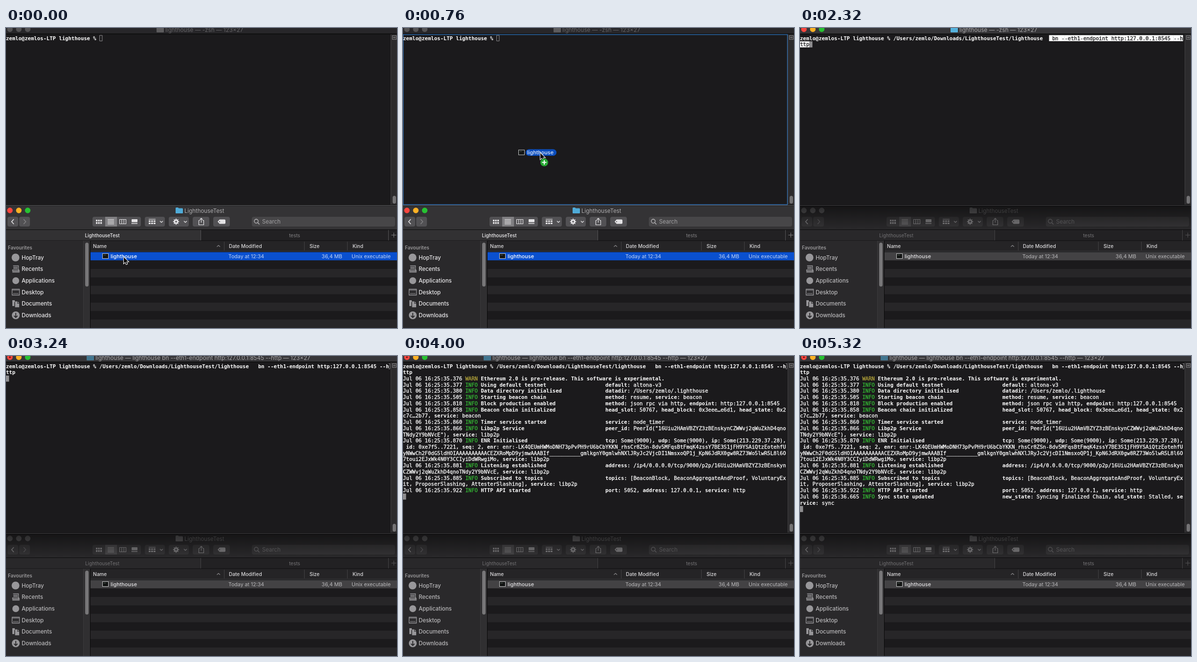
Recreate the animation shown at these times as an HTML page with a canvas. Size 800 by 615 pixels, loop 5360 ms.

```html
<!DOCTYPE html>
<html lang="en">
<head>
<meta charset="utf-8">
<style>
html, body { margin: 0; width: 100%; height: 100%; overflow: hidden; background: #1b1a1c; }
canvas { display: block; }
</style>
</head>
<body>
<canvas width="800" height="615"></canvas>
<script>
const ctx = document.querySelector('canvas').getContext('2d');
const LOOP = 5360, STEP = 40;
const DRAG = 100, DROP = 1040, ACTIVATE = 1080, SPACE = 1920, PASTE = 2120, ENTER = 3000, LOG = 3300;
const COLS = 123, CELL_W = 6.37, CELL_H = 12.73, TOP = 14.6;

const PEER = '16Uiu2HAmVBZYZ3zBEnskynCZWWvj2qWuZkhD4qnoTNdy2Y9bNVcE';
const ENR = 'enr:-LK4QEUmHWMoDNH73pPvPH9rU6bCbYKKN_rhsCr8ZSn-8dv5MFqsBtFmqK4zssY7BE3S1jFH9YSAiQtzEotehfU' +
  'yNWwCh2F0dG5ldHOIAAAAAAAAAACEZXRoMpD9yjmwAAABIf__________gmlkgnY0gmlwhNXlJRyJc2VjcDI1NmsxoQP1j_KpN6JdRX0gw8RZ73Wo5lwR5L8l6O' +
  '7toui2EJxWk4N0Y3CCIyiDdWRwgiMo';
const COMMAND = ' bn --eth1-endpoint http:127.0.0.1:8545 --http';
const LINES = [
  ['35.376', 'Ethereum 2.0 is pre-release. This software is experimental.', ''],
  ['35.377', 'Using default testnet', 'default: altona-v3'],
  ['35.380', 'Data directory initialised', 'datadir: /Users/zemlo/.lighthouse'],
  ['35.505', 'Starting beacon chain', 'method: resume, service: beacon'],
  ['35.818', 'Block production enabled', 'method: json rpc via http, endpoint: http:127.0.0.1:8545'],
  ['35.858', 'Beacon chain initialized', 'head_slot: 50767, head_block: 0x3eee…e6d1, head_state: 0x2c7c…2b77, service: beacon'],
  ['35.860', 'Timer service started', 'service: node_timer'],
  ['35.866', 'Libp2p Service', `peer_id: PeerId("${PEER}"), service: libp2p`],
  ['35.870', 'ENR Initialised', `tcp: Some(9000), udp: Some(9000), ip: Some(213.229.37.28), id: 0xe7f5..7221, seq: 2, enr: ${ENR}, service: libp2p`],
  ['35.881', 'Listening established', `address: /ip4/0.0.0.0/tcp/9000/p2p/${PEER}, service: libp2p`],
  ['35.885', 'Subscribed to topics', 'topics: [BeaconBlock, BeaconAggregateAndProof, VoluntaryExit, ProposerSlashing, AttesterSlashing], service: libp2p'],
  ['35.922', 'HTTP API started', 'port: 5052, address: 127.0.0.1, service: http'],
  ['36.665', 'Sync state updated', 'new_state: Syncing Finalized Chain, old_state: Stalled, service: sync'],
];

function rect(x, y, w, h, color, r = 0) {
  ctx.fillStyle = color;
  ctx.beginPath();
  ctx.roundRect(x, y, w, h, r);
  ctx.fill();
}
function disc(x, y, r, color) {
  rect(x - r, y - r, 2 * r, 2 * r, color, r);
}
function line(d, color, width = 1, x = 0, y = 0) {
  ctx.save();
  ctx.translate(x, y);
  ctx.strokeStyle = color;
  ctx.lineWidth = width;
  ctx.stroke(new Path2D(d));
  ctx.restore();
}
function shape(d, color, x = 0, y = 0) {
  ctx.save();
  ctx.translate(x, y);
  ctx.fillStyle = color;
  ctx.fill(new Path2D(d));
  ctx.restore();
}
function label(str, x, y, size, color, weight = 400, align = 'left') {
  ctx.font = `${weight} ${size}px Inter, sans-serif`;
  ctx.textAlign = align;
  ctx.fillStyle = color;
  ctx.fillText(str, x, y);
}
function folder(x, y, color) {
  shape('M0 1.5Q0 0 1.5 0H5L6.5 1.5H13.5Q15 1.5 15 3V11Q15 12 14 12H1Q0 12 0 11Z', color, x, y);
}
function lights(y, active) {
  ['#fb463f', '#fdb125', '#27c232'].forEach((c, i) => disc(8 + 18.2 * i, y, 5.7, active ? c : '#545355'));
}
function executable(x, y) {
  rect(x, y, 13, 11, '#c4c5c6');
  rect(x + 1, y + 1, 11, 9, '#121413');
  rect(x + 2.5, y + 3, 5, 1, '#4c5a50');
}

// Terminal text is laid on a character grid that wraps at the last column.
let col, row;
function print(str, color = '#fff', bold = false, back) {
  ctx.font = `${bold ? 'bold ' : ''}10.58px "DejaVu Sans Mono", monospace`;
  ctx.textAlign = 'left';
  ctx.lineWidth = .3;
  for (const ch of str) {
    if (col === COLS) newline();
    const x = col++ * CELL_W, y = TOP + row * CELL_H;
    if (back) rect(x, y, CELL_W + .3, 12.4, back);
    if (ch === ' ') continue;
    ctx.fillStyle = ctx.strokeStyle = color;
    ctx.fillText(ch, x, y + 9.9);
    if (!bold) ctx.strokeText(ch, x, y + 9.9);
  }
}
function newline() {
  col = 0;
  row++;
}
function printLog([time, message, fields]) {
  const warn = time === '35.376';
  print(`Jul 06 16:25:${time} `);
  print(warn ? 'WARN ' : 'INFO ', warn ? '#b5a63a' : '#35bd35');
  print(message.padEnd(fields ? 40 : 0), '#fff', true);
  fields.split(/(\w+)(?=: )/).forEach((part, i) => print(part, '#fff', i % 2 === 1));
  newline();
}

function terminal(t) {
  const active = t >= ACTIVATE, running = t >= ENTER;
  rect(0, 0, 800, 363, '#1b1a1c');
  rect(0, 0, 800, 12, active ? '#373639' : '#272629');
  rect(0, 11.5, 800, 1.3, '#060606');
  lights(2.5, active);
  if (running) disc(8, 2.5, 1.8, '#6d1512');
  const start = running ? 183 : 326;
  folder(start - 18, -3, running ? '#427690' : active ? '#55b2dd' : '#5c5b5d');
  label(`lighthouse — ${running ? 'lighthouse' + COMMAND : '-zsh'} — 123×27`, start, 8, 11.7, active ? '#aaa9ab' : '#656466');

  rect(787, 13, 13, 350, '#2c2b2d');
  rect(787, 13, 1, 350, '#414042');
  rect(791, 344, 7, 16, '#747375', 3.5);
  line('M790.5 15.5H798.5V23.5H790.5ZM792 18.5H797M792 20.5H797', '#8b8a8c');

  col = row = 0;
  print('zemlo@zemlos-LTP lighthouse % ', '#fff', true);
  if (active) {
    const fresh = t < SPACE;
    print('/Users/zemlo/Downloads/LighthouseTest/lighthouse ', fresh ? '#19181a' : '#fff', true, fresh && '#fff');
    if (!fresh) print(' ');
    if (t >= PASTE) print(COMMAND, running ? '#fff' : '#19181a', running, !running && '#fff');
  }
  if (running) {
    line('M783 15.5H785.5V26.5H783', '#858486');
    newline();
    for (const entry of LINES) if (t >= LOG + (entry[0] - 35.376) * 1000) printLog(entry);
  }
  const x = col * CELL_W, y = TOP + row * CELL_H;
  if (active) rect(x, y, 6.3, 12.5, '#8f8e90');
  else line('M.5 .5H5.8V12H.5Z', '#8f8e90', 1, x, y);
}

function toolbar(active) {
  const ink = active ? '#e4e3e5' : '#79787a', face = active ? '#525154' : '#343335';
  [[3, 22], [27, 22], [177, 99], [284, 41], [333, 41], [382, 34], [424, 34]]
    .forEach(([x, w]) => rect(x, 387, w, 20, face, 4));
  rect(203, 387, 24, 20, active ? '#807f82' : '#464547');
  rect(503, 387, 293, 20, active ? '#474648' : '#343335', 4);
  line('M16 392L11.5 397L16 402', ink, 1.6);
  line('M36 392L40.5 397L36 402', active ? '#807f82' : '#535254', 1.6);
  for (let i = 0; i < 6; i++) rect(184 + i % 3 * 4.5, 393 + (i / 3 | 0) * 5, 3.2, 3.5, ink);
  for (let i = 0; i < 4; i++) rect(208, 392 + i * 3, 13, 1.2, ink);
  line('M232.5 392.5H245.5V401.5H232.5ZM236.8 392V402M241.2 392V402', ink, 1.2);
  rect(257, 392, 12, 6, ink, 1);
  for (let i = 0; i < 4; i++) rect(257 + i * 3.1, 399.5, 2.3, 2.3, ink);
  rect(292, 391.5, 14, 1.2, ink);
  for (let i = 0; i < 6; i++) rect(292 + i % 3 * 5, 394.5 + (i / 3 | 0) * 4.5, 3.8, 3, ink);
  for (const x of [318, 367]) line('M-3 -1.3L0 1.5L3 -1.3', ink, 1.3, x, 397);
  for (let i = 0; i < 4; i++) {
    const a = i * Math.PI / 4, c = 6.2 * Math.cos(a), s = 6.2 * Math.sin(a);
    line(`M${c} ${s}L${-c} ${-s}`, ink, 2, 348, 397);
  }
  disc(348, 397, 4.5, ink);
  disc(348, 397, 1.7, face);
  line('M397 394.5H394.5V403.5H404.5V394.5H402M399.5 399V390M396.5 393L399.5 390L402.5 393', ink, 1.2);
  shape('M433 397L437 392.5H447Q449 392.5 449 394.5V399.5Q449 401.5 447 401.5H437Z', ink);
  disc(437, 397, 1.1, face);
  const hint = active ? '#a2a1a3' : '#636264';
  line('M516 396A4 4 0 1 1 508 396A4 4 0 1 1 516 396M515 399L518.5 402.5', active ? '#bdbcbe' : hint, 1.3);
  label('Search', 524, 401, 11.4, hint);
}

function sidebar(active) {
  const ink = '#98979a', text = active ? '#e9e8ea' : '#b9b8ba';
  rect(0, 436, 172, 179, '#2a292b');
  rect(158, 436, 14, 179, '#302f31');
  rect(158, 436, 1, 179, '#3a393b');
  rect(162, 440, 7, 90, '#777678', 3.5);
  label('Favourites', 4, 454, 9.8, '#99989a', 600);
  ['HopTray', 'Recents', 'Applications', 'Desktop', 'Documents', 'Downloads']
    .forEach((name, i) => label(name, 32, 474.8 + 23.65 * i, 11.4, text, 500));
  disc(19.5, 470.5, 8, ink);
  line('M14.5 487.5H25.5V498.5H13.5V495M15 490.5H24M15 493H24M13 496H27M13 500.5H27V496', ink, 1.3);
  disc(20, 518, 7, ink);
  line('M12.5 535.5H27.5V547.5H12.5Z', ink, 1.3);
  rect(13, 536, 14, 2.5, '#626164');
  for (let i = 0; i < 4; i++) rect(15 + i * 2.8, 543.5, 1.7, 1.7, ink);
  shape('M13 558H18V562H17V570H13Z', ink);
  shape('M18.5 560.5H23V565H27V572.5H18.5ZM24 560.5L27 564H24Z', ink);
  disc(20, 589, 8, ink);
  line('M20 584V593M16.3 589.8L20 593.5L23.7 589.8', '#2a292b', 1.8);
}

function fileList(active) {
  rect(172, 436, 628, 179, '#1b1a1c');
  rect(172, 436, 1, 179, '#080808');
  rect(173, 437, 627, 20, '#252426');
  rect(173, 457, 627, 1, '#3d3c3e');
  for (const x of [446, 610, 698]) rect(x, 438, 1, 18, '#434244');
  [['Name', 178], ['Date Modified', 456], ['Size', 621], ['Kind', 709]]
    .forEach(([name, x]) => label(name, x, 450.7, 10.1, '#dcdbdd', 500));
  line('M431.5 448.5L434.8 445.5L438 448.5', '#8a898b', 1.2);
  for (let y = 494; y < 615; y += 34.5) rect(173, y, 627, 17.3, '#272628');
  rect(173, 459.5, 627, 16.7, active ? '#0a50cf' : '#434244');
  executable(197, 462);
  label('lighthouse', 214, 472, 10.8, active ? '#fff' : '#e2e1e3', 500);
  const info = active ? '#c3d5f5' : '#bab9bb';
  label('Today at 12:34', 455, 472, 10.6, info);
  label('36,4 MB', 688, 472, 10.6, info, 400, 'right');
  label('Unix executable', 707, 472, 10.6, info);
}

// The front window above casts a shadow on the inactive one.
function shadow() {
  const fade = ctx.createLinearGradient(0, 364, 0, 412);
  fade.addColorStop(0, 'rgba(0,0,0,.5)');
  fade.addColorStop(1, 'rgba(0,0,0,0)');
  rect(0, 364, 800, 48, fade);
}

function browser(active) {
  rect(0, 362, 800, 253, '#0b0b0c');
  rect(0, 363, 800, 1.2, active ? '#626163' : '#4a494b');
  rect(0, 365, 800, 48, active ? '#343335' : '#29282a');
  lights(374, active);
  folder(347, 368, active ? '#4fabd8' : '#5c5b5d');
  const title = active ? '#adacae' : '#626163';
  label('LighthouseTest', 365, 378.5, 11.4, title);
  toolbar(active);
  if (!active) shadow();

  const edge = active ? '#555456' : '#444345';
  rect(0, 414, 398, 21.5, active ? '#323133' : '#29282a');
  rect(399, 414, 401, 21.5, '#222123');
  rect(398, 414, 1, 21.5, edge);
  rect(782, 414, 1, 21.5, edge);
  label('LighthouseTest', 197, 428.7, 9.75, active ? '#f2f1f3' : '#737274', active ? 500 : 400, 'center');
  label('tests', 590.5, 428.7, 10, active ? '#828183' : '#757476', 400, 'center');
  line('M788.5 424.5H798.5M793.5 419.5V429.5', active ? '#828183' : '#535254');
  sidebar(active);
  fileList(active);
}

function pointer(t) {
  if (t >= DROP) {
    if (t >= SPACE) return;
    const beam = 'M-3.5 -7.5Q0 -7.5 0 -5V5Q0 7.5 -3.5 7.5M3.5 -7.5Q0 -7.5 0 -5V5Q0 7.5 3.5 7.5M-2 1.5H2';
    line(beam, '#fff', 3, 397, 166.5);
    line(beam, '#1b1a1c', 1, 397, 166.5);
    return;
  }
  const u = Math.max(0, (t - DRAG) / (DROP - DRAG));
  const x = 241 + 155 * u ** 3.83, y = 470 - 304 * u;
  const inTerminal = y < 362;
  if (inTerminal) line('M.5 13.5H786.5V362H.5Z', '#2e6cae', 1.3);
  if (t > DRAG) {
    executable(x - 45, y - 7);
    rect(x - 30, y - 8, 63, 13.5, '#0a4dbd', 6.7);
    label('lighthouse', x - 27, y + 2.6, 10.8, '#e6edfb', 500);
  }
  const arrow = 'M0 0V12.5L3 9.8L5.1 14.5L7.2 13.5L5.2 9H9.2Z';
  line(arrow, '#fff', 2, x, y);
  shape(arrow, '#0c0c0d', x, y);
  if (u > 0 && inTerminal) {
    disc(x + 8, y + 19, 8, '#28a734');
    line('M-4.5 0H4.5M0 -4.5V4.5', '#fff', 2, x + 8, y + 19);
  }
}

function draw(now) {
  const t = Math.floor(now % LOOP / STEP) * STEP;
  terminal(t);
  browser(t < ACTIVATE);
  pointer(t);
  requestAnimationFrame(draw);
}
requestAnimationFrame(draw);
</script>
</body>
</html>
```
